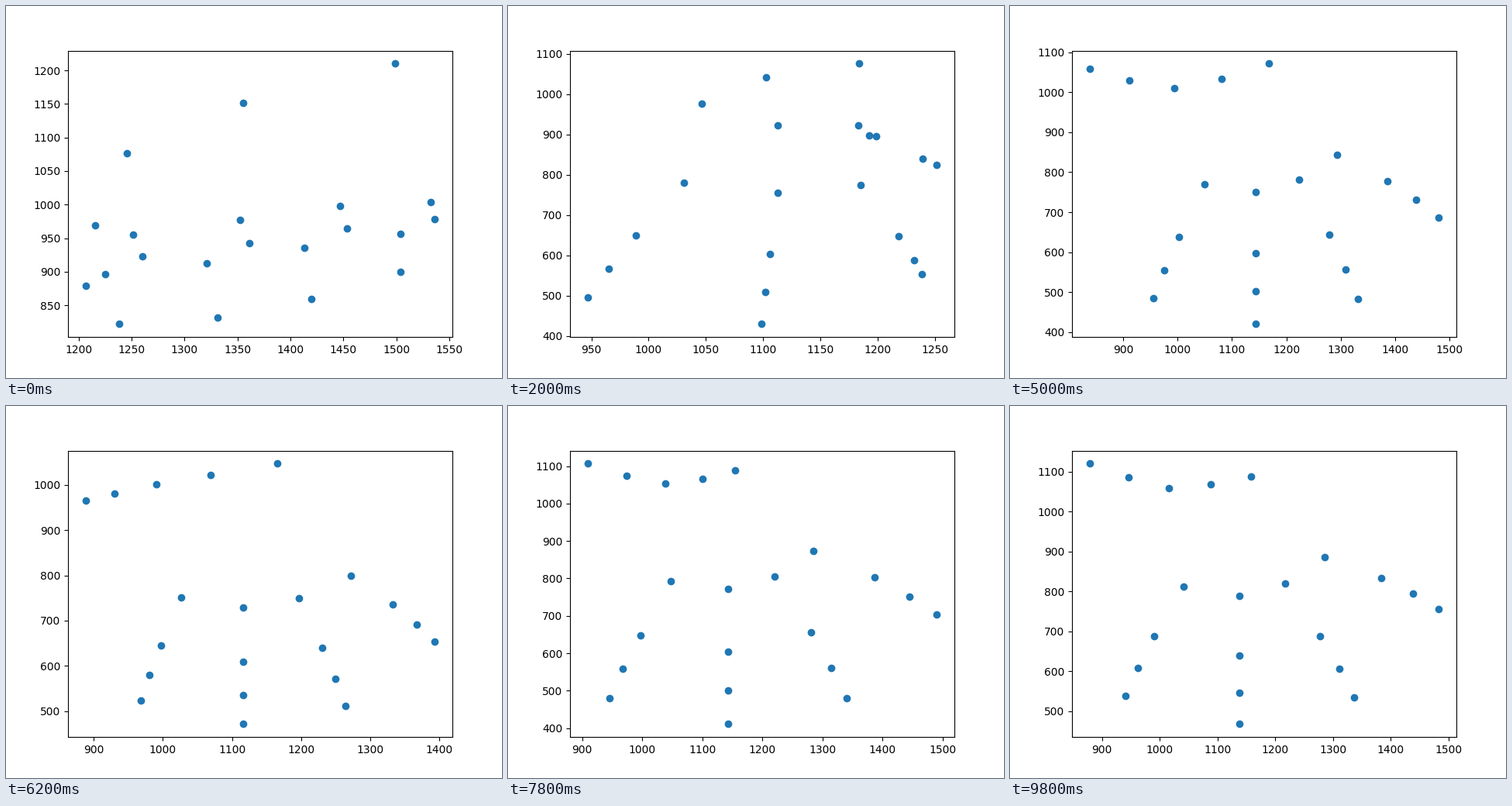
A matplotlib script that plays this animation: 640 px wide and 480 px high, repeating every 10 s.

```python
import numpy as np
import matplotlib.pyplot as plt
from matplotlib.animation import FuncAnimation

FRAMES, INTERVAL = 50, 200

# Proportions of every hand, index finger to little finger
LENGTH = np.array([0.91, 1, 0.96, 0.74])   # against the middle finger
SPREAD = np.array([-0.9, 0, 1, 2.5])       # share of the fan angle
BONES = np.array([1, 0.62, 0.53])          # lengths along a finger
JOINTS = np.array([1, 1.8, 2.4])           # share of the curl angle
THUMB = np.array([0, 0.2, 0.85, 1])        # share of the thumb's bend

# Part of a move in which each finger unfolds
UNFOLD = [(0, 0.4), (0.3, 0.7), (0.6, 1), (0, 1)]


def pose(wrist, first, last, thumb, reach, fan,
         tilt=0, arch=0.18, roll=0, curl=(0, 0, 0, 0)):
    """first and last: outer knuckles seen from the wrist.
    thumb: lean, bend, length of its first and last bone."""
    return np.array([*wrist, *first, *last, *thumb,
                     reach, fan, tilt, arch, roll, *curl], float)


POSES = {
    # fist
    0: pose((1499, 1210), (-261, -388), (5, -310), (-68, 62, 155, 90),
            148, -3, tilt=-14, arch=0.06, roll=0.25, curl=[124] * 4),
    # three fingers, then four
    10: pose((1184, 1076), (-153, -295), (68, -251), (-68, 140, 88, 84),
             152, 17, tilt=-2.4, curl=(0, 0, 26, 100)),
    18: pose((1161, 1091), (-118, -311), (118, -258), (-62, 143, 100, 90),
             152, 15.5, tilt=-5, arch=0.155),
    # open hand, drifting
    25: pose((1167, 1072), (-118, -302), (126, -228), (-66, -45, 95, 79),
             154, 21.7),
    31: pose((1166, 1047), (-140, -296), (106, -247), (-76, 6, 100, 45),
             120, 17.2, arch=0.155),
    39: pose((1154, 1088), (-106, -296), (131, -214), (-68, -48, 58, 73),
             168, 21.9, arch=0.2),
    49: pose((1158, 1089), (-116, -276), (128, -202), (-74, -43, 72, 76),
             149.5, 24.5, arch=0.2),
}


def ease(u, start=0, end=1):
    u = np.clip((u - start) / (end - start), 0, 1)
    return u * u * (3 - 2 * u)


def chain(base, lengths, leans, side=0):
    """Joints of a row of bones; a lean of 0 degrees points up the hand."""
    a = np.radians(leans)
    steps = np.stack([lengths * np.sin(a) + side, -lengths * np.cos(a)], 1)
    return base + np.cumsum(steps, axis=0)


def pose_at(frame):
    keys = list(POSES)
    i = np.searchsorted(keys, frame, side="right") - 1
    i = min(i, len(keys) - 2)
    u = (frame - keys[i]) / (keys[i + 1] - keys[i])
    a, b = POSES[keys[i]], POSES[keys[i + 1]]
    blend = np.full(len(a), ease(u))
    blend[-4:] = [ease(u, *span) for span in UNFOLD]
    return a + (b - a) * blend


def hand(frame):
    p = pose_at(frame)
    wrist, first, last = p[0:2], p[2:4], p[4:6]
    lean, bend, root, tip = p[6:10]
    reach, fan, tilt, arch, roll = p[10:15]

    points = [wrist[None],
              chain(wrist, np.linspace(root, tip, 4), lean + bend * THUMB)]
    row = last - first
    lift = arch * np.array([row[1], -row[0]])
    for i, curl in enumerate(p[15:]):
        knuckle = wrist + first + row * i / 3 + lift * (0, 1, 0.88, 0)[i]
        bones = reach * LENGTH[i] * BONES
        fold = np.radians(curl * JOINTS)
        leans = tilt + fan * SPREAD[i] * np.array([1, 0.9, 0.8])
        points += [knuckle[None],
                   chain(knuckle, bones * np.cos(fold), leans,
                         -roll * bones * np.sin(fold))]
    return np.vstack(points)


fig, ax = plt.subplots(figsize=(6.4, 4.8), dpi=100)


def draw(frame):
    ax.clear()
    ax.scatter(*hand(frame).T, color="C0")


anim = FuncAnimation(fig, draw, frames=FRAMES, interval=INTERVAL,
                     init_func=lambda: None, repeat=True, repeat_delay=0)
plt.show()
```
